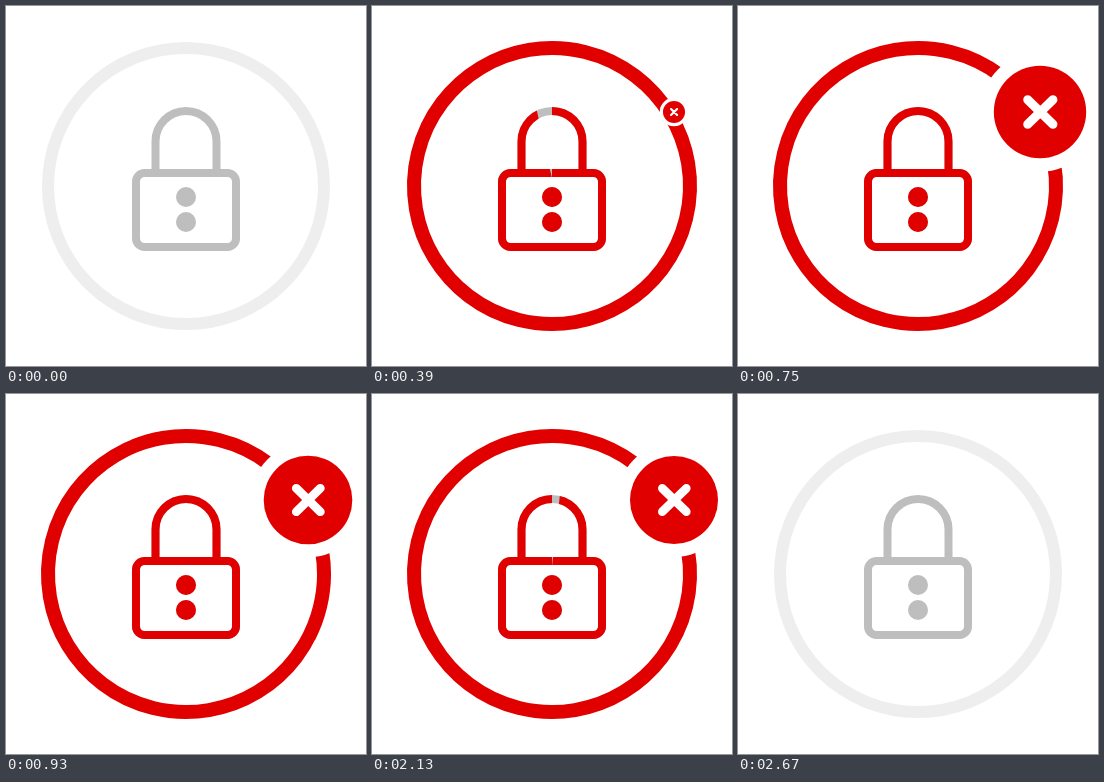
An HTML page for the animation above (3.6 s loop, 360 by 360 pixels).

```html
<!DOCTYPE html>
<html lang="en">
<head>
<meta charset="utf-8">
<title>Lock status</title>
<style>
  html, body { margin: 0; width: 100%; height: 100%; overflow: hidden; background: #fff; }
  svg { display: block; width: 100vw; height: 100vh; }
  .red { color: #e10000; }
  .gray { color: #bebebe; }
</style>
</head>
<body>
<svg viewBox="0 0 360 360">
  <defs>
    <g id="lock">
      <g fill="none" stroke="currentColor" stroke-width="8">
        <path d="M149.5 167V135.5a30.5 30.5 0 0 1 61 0V167"/>
        <rect x="130" y="167" width="100" height="74" rx="8.5"/>
      </g>
      <g fill="currentColor">
        <circle cx="180" cy="191" r="10"/>
        <circle cx="180" cy="216" r="10"/>
      </g>
    </g>
    <clipPath id="wipe"><path id="sector"/></clipPath>
  </defs>

  <circle cx="180" cy="180" r="138" fill="none" stroke="#eee" stroke-width="12"/>
  <circle id="ring" cx="180" cy="180" r="138" fill="none" stroke="#e10000" stroke-width="14"
    stroke-linecap="round" pathLength="360" transform="rotate(-31.2 180 180)"/>

  <use href="#lock" class="gray"/>
  <g clip-path="url(#wipe)"><use href="#lock" class="red"/></g>

  <g id="badge">
    <circle r="57" fill="#fff"/>
    <circle r="44" fill="#e10000"/>
    <path d="M-11.7 -11.7L12.3 11.7M12.3 -11.7L-11.7 11.7" stroke="#fff" stroke-width="8.6" stroke-linecap="round"/>
  </g>
</svg>
<script>
const LOOP = 3600, STEP = 30;
const DRAW = { at: 4, ms: 400 };
const ERASE = { at: 2123, ms: 400 };
const POP = { at: 382, decay: 75, rise: 48, end: 1170 };
const SHRINK = { at: 2352, ms: 300, back: 3.15 };

const el = id => document.getElementById(id);
const ring = el('ring'), sector = el('sector'), badge = el('badge');
const progress = (t, span) => Math.min(1, Math.max(0, (t - span.at) / span.ms));
const easeOut = p => 1 - (1 - p) ** 3;
const easeIn = p => p ** 3;

// Clockwise pie slice around the lock's centre; 0 and 1 point up.
function slice(from, to) {
  if (to <= from) return 'M0 0Z';
  let d = 'M180 172.5';
  for (let i = 0; i <= 16; i++) {
    const a = 2 * Math.PI * (from + (to - from) * i / 16);
    d += `L${180 + 140 * Math.sin(a)} ${172.5 - 140 * Math.cos(a)}`;
  }
  return d + 'Z';
}

function drawRing(from, to) {
  const on = to > from;
  ring.style.display = on ? '' : 'none';
  if (!on) return;
  ring.setAttribute('stroke-dasharray', `${360 * (to - from)} 720`);
  ring.setAttribute('stroke-dashoffset', -360 * from);
}

function badgeScale(t) {
  if (t < POP.at) return 0;
  if (t < POP.end) {
    const s = t - POP.at;
    return 1 + Math.exp(-s / POP.decay) * (s / POP.rise - 1);
  }
  const p = progress(t, SHRINK), b = SHRINK.back;
  return 1 - p * p * ((b + 1) * p - b);
}

function render(t) {
  const drawn = progress(t, DRAW), erased = progress(t, ERASE);
  drawRing(easeIn(erased), easeOut(drawn));
  sector.setAttribute('d', slice(erased, drawn));
  const k = badgeScale(t);
  badge.style.display = k > 0.001 ? '' : 'none';
  badge.setAttribute('transform', `translate(302 106) scale(${k})`);
}

const start = performance.now();
function tick() {
  const t = (performance.now() - start) % LOOP;
  render(Math.floor(t / STEP) * STEP);
  requestAnimationFrame(tick);
}
tick();
</script>
</body>
</html>
```
